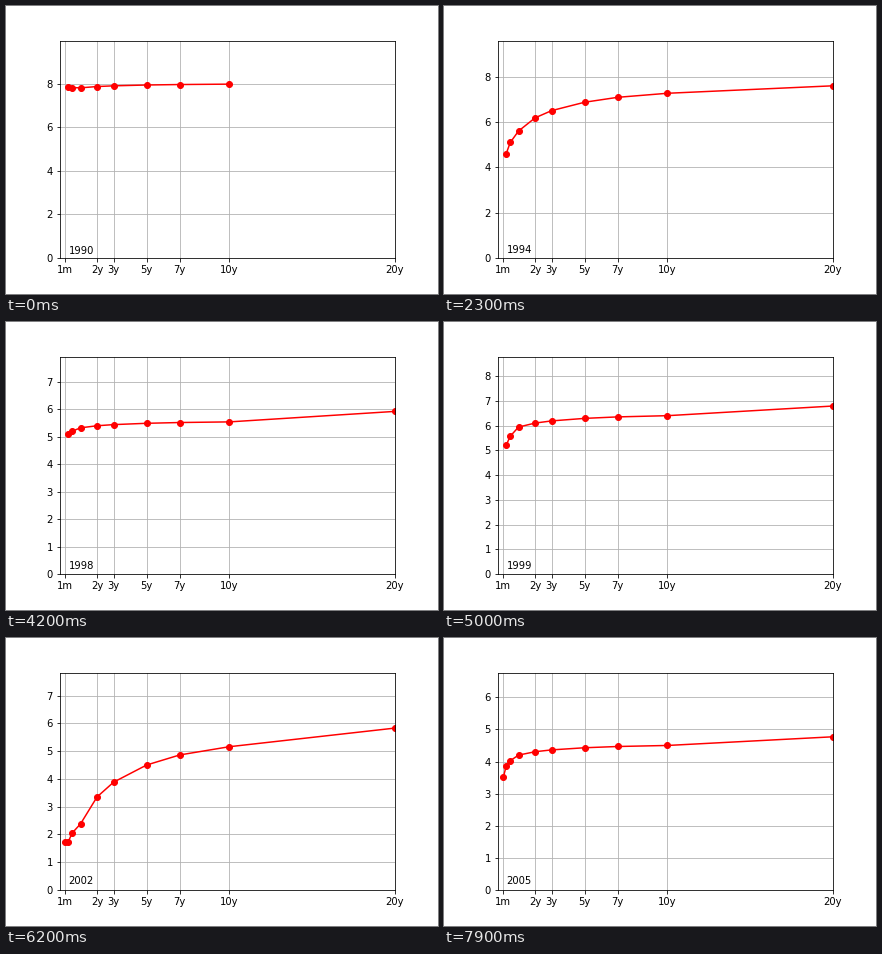
Animation, 432 px wide and 288 px high, one loop 8 s. Source, as a matplotlib script:

```python
import numpy as np
import matplotlib.pyplot as plt
from matplotlib.animation import FuncAnimation

FRAMES, INTERVAL = 80, 100
FIRST_YEAR = 1990
DAYS_PER_FRAME, DAYS_PER_YEAR = 50, 250.2

# Maturities in years: 1m 3m 6m 1y 2y 3y 5y 7y 10y 20y
TERMS = np.array([1 / 12, 0.25, 0.5, 1, 2, 3, 5, 7, 10, 20])
FROM_1M, FROM_20Y = 58, 19   # steps at which these maturities are first quoted

# Turning points of the market: the 3m, 1y, 10y and 20y rates.
TURNS = {
    0: (7.83, 7.81, 7.98, 8.40),
    4: (7.40, 7.60, 8.68, 8.90),
    10: (3.96, 4.15, 6.71, 7.50),
    12: (3.78, 4.26, 7.44, 8.00),
    19: (3.10, 3.38, 5.27, 5.95),
    23: (4.60, 5.61, 7.28, 7.61),
    25: (5.90, 7.15, 7.88, 8.05),
    30: (5.20, 5.10, 5.60, 6.05),
    34: (5.15, 5.57, 6.56, 6.96),
    43: (5.08, 5.30, 5.42, 5.80),
    44: (4.00, 4.10, 4.57, 5.35),
    50: (5.20, 5.94, 6.40, 6.79),
    54: (6.25, 6.00, 5.75, 6.05),
    59: (2.22, 2.35, 4.58, 5.40),
    62: (1.73, 2.38, 5.16, 5.83),
    67: (1.13, 1.20, 3.42, 4.40),
    72: (1.07, 1.80, 4.68, 5.40),
    79: (3.85, 4.20, 4.50, 4.77),
}


def blend(a, b, u):
    return a + (b - a) * u


def curve(k):
    """Maturities quoted at step k and their rates."""
    short, one, ten, twenty = (np.interp(k, list(TURNS), col)
                               for col in zip(*TURNS.values()))
    # The belly rises with log maturity, eased out towards ten years.
    belly = blend(one, ten, 1 - (1 - np.log10(TERMS[3:9])) ** 1.2)
    gap = 0.34 * ((k - FROM_1M) / (FRAMES - 1 - FROM_1M)) ** 2
    rates = np.array([short - gap, short, blend(short, one, 0.5), *belly, twenty])
    quoted = slice(0 if k >= FROM_1M else 1, None if k >= FROM_20Y else -1)
    return TERMS[quoted], rates[quoted]


def year(k):
    return FIRST_YEAR + int(k * DAYS_PER_FRAME / DAYS_PER_YEAR)


plt.rcParams["font.family"] = "DejaVu Sans"
fig, ax = plt.subplots(figsize=(6, 4), dpi=72)
fig.subplots_adjust(left=0.125, right=0.9, bottom=0.125, top=0.88)
ax.set_xlim(-0.24, 20)
ax.set_xticks([1 / 12, 2, 3, 5, 7, 10, 20],
              ["1m", "2y", "3y", "5y", "7y", "10y", "20y"])
ax.grid(True)
line, = ax.plot([], [], "ro-")
label = ax.text(0.28, 0.2, "")


def update(k):
    terms, rates = curve(k)
    line.set_data(terms, rates)
    ax.set_ylim(0, rates.max() + 2)
    label.set_text(str(year(k)))
    return line, label


anim = FuncAnimation(fig, update, frames=FRAMES, init_func=lambda: update(0),
                     interval=INTERVAL, repeat=True, repeat_delay=0)
plt.show()
```
